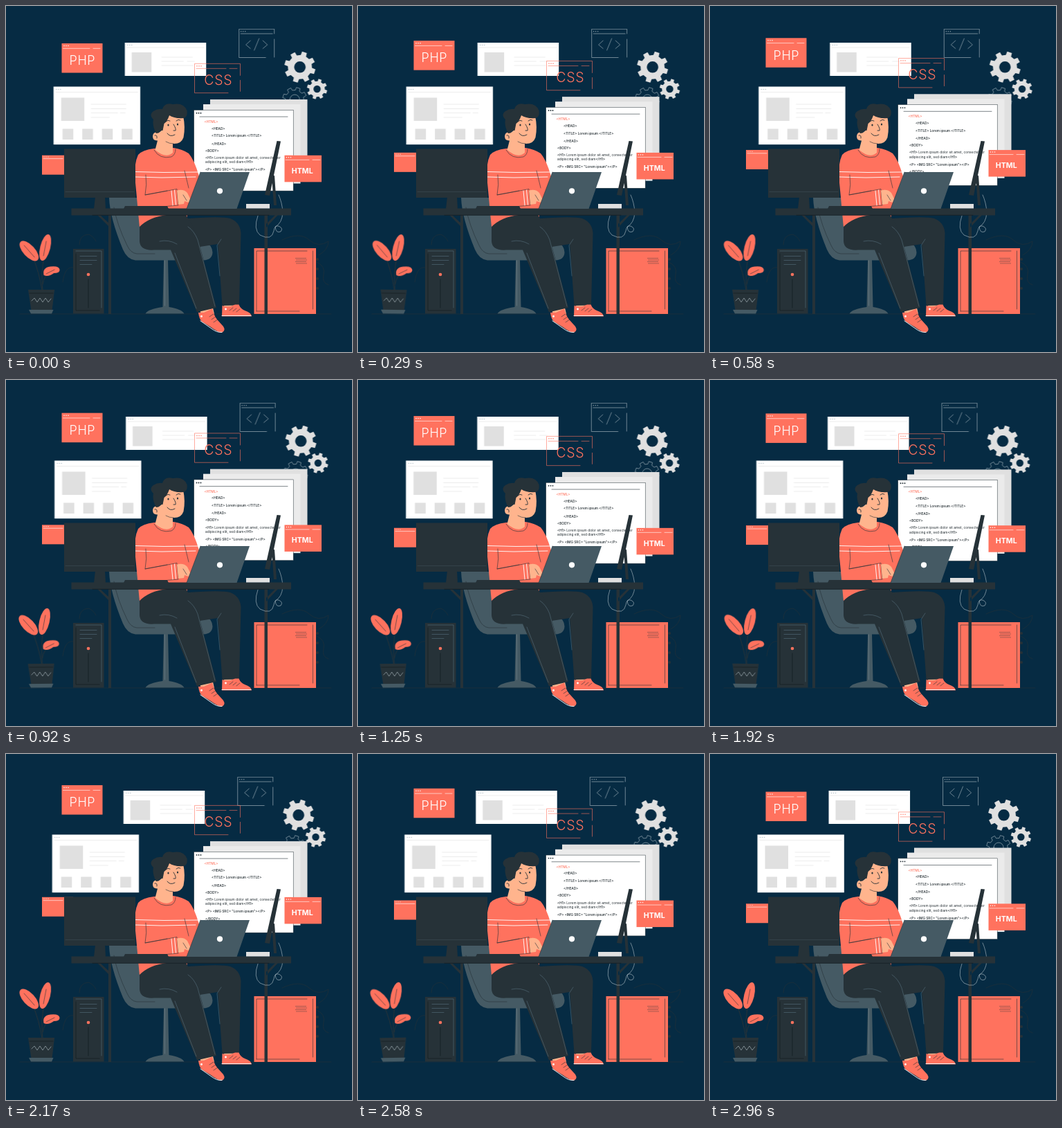
Animation, 500 px wide and 500 px high, one loop 3 s. Source, as an HTML page:

```html
<!DOCTYPE html>
<html lang="en">
<head>
<meta charset="utf-8">
<title>Programmer at work</title>
<style>
  html, body { margin: 0; width: 100%; height: 100%; overflow: hidden; background: #062b43; }
  svg { display: block; width: 100vw; height: 100vh; }
  text { font-family: Inter, "Open Sans", sans-serif; }

  .drift { animation: drift 1.5s cubic-bezier(.37, 0, .63, 1) -.8s infinite alternate; }
  .float { animation: float .75s linear -.05s infinite alternate; }
  .sway { transform-origin: 51px 445px; animation: sway .75s linear -.425s infinite alternate; }
  @keyframes drift { from { transform: translateX(-1.8px); } to { transform: translateX(1.8px); } }
  @keyframes float { from { transform: translateY(0); } to { transform: translateY(-10px); } }
  @keyframes sway { from { transform: rotate(-1deg); } to { transform: rotate(1deg); } }

  .coral { fill: #ff725e; }
  .dark { fill: #263238; }
  .slate { fill: #455a64; }
  .skin { fill: #ffb48d; }
  .white { fill: #fff; }
  .pale { fill: #e0e0e0; }
  .line { fill: none; stroke-width: .6; stroke-linecap: round; stroke-linejoin: round; }
  .ink { stroke: #263238; }
  .chalk { stroke: #fff; }
  .fog { stroke: #b8c4cc; }
  .mist { stroke: #e0e0e0; }
  .red { stroke: #ff725e; }
  .steel { stroke: #56707c; }
  .dots { fill: none; stroke-width: 1.5; stroke-linecap: round; stroke-dasharray: 0 3; }
  .code { font-size: 4.75px; font-weight: 500; fill: #1b252a; }
  .code tspan { font-weight: 400; letter-spacing: .06px; }
</style>
</head>
<body>
<svg viewBox="0 0 500 500">
  <path class="line ink" d="M20 445H470"/>
  <path class="line ink" d="M106 345Q106 331 119 330Q126 332 130 340M399 338Q425 326 438 338T466 340Q466 352 452 360M449 370Q462 376 459 388T466 403"/>
  <path class="line ink" d="M82 399Q85 375 98 378"/>

  <!-- Drifting backdrop -->
  <g class="drift">
    <rect class="white" x="171.5" y="53" width="117.5" height="48"/>
    <path class="dots fog" d="M175.5 56.5h6.2"/>
    <path class="line mist" d="M174 60H286M225 74H269M225 80H256M262 80H272M225 86H270"/>
    <rect class="pale" x="181.5" y="67" width="28.5" height="28.5"/>

    <rect class="white" x="68.5" y="116.5" width="125.3" height="83.7"/>
    <path class="dots fog" d="M72.5 120.5h6.2"/>
    <path class="line mist" d="M72 124.5H190M123 142H173M123 148.5H173M123 154.5H161M165 154.5H172M123 161H149"/>
    <rect class="pale" x="79.5" y="132.5" width="33.5" height="33.5"/>
    <path class="pale" d="M81.5 177.5h15.5v15.5h-15.5zM110 177.5h15.5v15.5h-15.5zM138.5 177.5h15.5v15.5h-15.5zM167 177.5h15.5v15.5h-15.5z"/>

    <path class="line fog" d="M375 74.5H336.500V33.300H387.500V40M387.500 48V74M339 40H385M353 50L346.500 56L353 61.500M365.500 47L358.500 64M371 50L377.500 56L371 61.500"/>
    <path class="dots fog" style="stroke-width:1.200" d="M339.500 36.700h6.200"/>

    <path id="gearBig" class="pale" fill-rule="evenodd"/>
    <path id="gearSmall" class="pale" fill-rule="evenodd"/>
    <path id="gearLine" class="line fog"/>
  </g>

  <!-- Floating windows -->
  <g class="float">
    <rect x="295" y="135.700" width="140.500" height="116" fill="#e0e0e0"/>
    <rect x="285" y="142.700" width="140.500" height="114.500" fill="#ebebeb"/>
    <rect class="white ink" x="271.700" y="151" width="143.500" height="116.800" stroke-width=".5"/>
    <path class="dots ink" style="stroke-width:1.900" d="M275.500 155.500h6.500"/>
    <path class="line ink" d="M280 160.700H407"/>
    <g class="code">
      <text x="286.500" y="169.700" class="coral">&lt;HTML&gt;</text>
      <text x="297" y="179.300">&lt;HEAD&gt;</text>
      <text x="297" y="190.100">&lt;TITLE&gt; Lorem ipsum &lt;/TITLE&gt;</text>
      <text x="297" y="201.200">&lt;/HEAD&gt;</text>
      <text x="288" y="211.200">&lt;BODY&gt;</text>
      <text x="288" y="221.600">&lt;H1&gt; <tspan>Lorem ipsum dolor sit amet, consectetuer</tspan></text>
      <text x="288" y="228"><tspan>adipiscing elit, sed diam</tspan>&lt;/H1&gt;</text>
      <text x="288" y="239">&lt;P&gt; &lt;IMG SRC= "Lorem ipsum"&gt;&lt;/P&gt;</text>
      <text x="288" y="249.300">&lt;/BODY&gt;</text>
    </g>

    <rect class="coral" x="80.500" y="54.700" width="59" height="42.500"/>
    <path class="dots chalk" d="M84 58.200h6.200"/>
    <path class="line chalk" d="M82.500 62H121M126 62H136"/>
    <text class="white" x="110.300" y="86" font-size="18" font-weight="300" letter-spacing=".5" text-anchor="middle">PHP</text>

    <path class="line red" d="M321 126.300H272.500V84H338.500V101M338.500 108V124M275 91H318M323 91H334"/>
    <path class="dots red" d="M276 87.500h6.200"/>
    <text class="coral" x="306.800" y="114.700" font-size="19.500" font-weight="300" letter-spacing=".8" text-anchor="middle">CSS</text>

    <rect class="coral" x="52" y="216.400" width="45" height="28"/>
    <path class="dots chalk" style="stroke-width:1.100" d="M55 218.700h6.200"/>
    <path class="line chalk" d="M54 221.300H82"/>

    <rect class="coral" x="402.500" y="216.500" width="53.500" height="38.500"/>
    <path class="dots chalk" d="M405.500 219.500h6.200"/>
    <path class="line chalk" d="M404 223H438M443 223H454"/>
    <text class="white" x="428.300" y="242.300" font-size="10.600" font-weight="700" text-anchor="middle">HTML</text>
  </g>

  <!-- Computer towers -->
  <rect class="coral" x="358.500" y="350" width="89.500" height="95"/>
  <path class="line ink" d="M362 441V354H435M443.500 354V438M362 441H424"/>
  <path class="dots ink" style="stroke-width:1;stroke-dasharray:0 2" d="M419 364.500H434.500M420 367H435M419 369.500H434.500M420 372H435"/>
  <path class="dots ink" style="stroke-width:4;stroke-dasharray:0 14" d="M450 366V409"/>
  <rect class="dark" x="97" y="351" width="44.500" height="93.500"/>
  <path class="line steel" d="M101 354H138V436M107 361.500H131M107 367.500H131M107 373.500H124"/>
  <path class="line" stroke="#10191e" d="M101 358V440H135M119 395V436"/>
  <circle class="coral" cx="119" cy="388" r="2.300"/>

  <!-- Chair -->
  <path class="slate" d="M149 277H197L200 340H286Q298 345 298.500 356Q298 367 285 367.500H187Q175 366 169 352Q150 306 149 277Z"/>
  <path class="line ink" d="M156 291Q160 315 175 346Q180 357 189 358H215"/>
  <path class="slate" d="M228 366H234L235.500 435Q254 438 257.500 444.500H201.500Q205 438 226.500 435Z"/>
  <path class="line" stroke="#6f838d" d="M229.500 368V433"/>

  <!-- Torso and head -->
  <path class="coral" d="M214 206Q197 208 191 215Q185 227 186.500 250L193 320H258L266 286L279 246Q272 222 264 213Q255 207 242 205Z"/>
  <path class="line chalk" style="stroke-width:.9" d="M187 239.500L228 240.500L277 240M187 247L225 248L274 247"/>
  <path class="line ink" d="M202 244Q204 258 201 273L233 267M258 238L264 263M214 208Q222 222 239 218Q245 215 245 207"/>
  <path class="line ink" d="M201 273L247 264.500L249 288L226 290"/>
  <path class="line chalk" style="stroke-width:.9" d="M239 267L241 288M243.500 266L245.500 287"/>
  <path class="skin" d="M247 266.500Q257 264 262 270L267 280L264 284L258 282L257 286L249 287Z"/>
  <path class="line ink" d="M256 273L261 281"/>
  <path class="skin" d="M227 166Q240 150 256 159Q259.500 175 256.500 190Q253 200 241 199L241 212Q231 221 215.500 208L219 194.500Q212 195 212 188Q213 181 221 183L226 179Z"/>
  <path class="dark" d="M217 184Q211 173 213 164Q206 157 213 152Q219 148 226 149Q229 139 241 142Q257 139 261.500 151Q263 160 257 162Q243 163 236 158Q233 167 228.500 170L226.500 180Q222 179 220.500 183.500Z"/>
  <path class="line ink" style="stroke-width:.9" d="M231 167Q234 164 237 166M246 166Q249 163 252 165M242 171Q246 177 245 180H242M233 184Q237 190 244 186M215 187Q219 186 218 191"/>
  <path class="line ink" d="M231 196Q236 199 242 199"/>
  <ellipse class="dark" cx="234.500" cy="172" rx="1.100" ry="1.500"/>
  <ellipse class="dark" cx="248" cy="171" rx="1.100" ry="1.500"/>

  <!-- Legs -->
  <path class="skin" d="M279 436L298 432L301 445L283 449ZM315 428H332V438H315Z"/>
  <path class="dark" d="M252 308Q310 303 324 307Q338 312 339.500 328L337 432.500L312.500 433L306 344L280 348Z"/>
  <path class="dark" d="M193 319Q207 305 232 302H260Q271 318 277 335L304 436L276 442.500L238 352.500H214Q194 354 193 340Z"/>
  <path class="line steel" d="M263 319Q272 325 277 338L302 434M244 357L275 437M247 344Q235 337 222 340M311 337L305 346L309 390"/>
  <path class="coral" d="M278 443L286 443Q293 440 298 437.500Q301 448 305 453L314 463Q318 469 312 472Q305 471 296 464L283 456Q279 452 278 443ZM312.500 433Q323 436 331 431.500H336.500Q339 438 346 440.500Q354 443 355 448.500H312Z"/>
  <path class="line chalk" style="stroke-width:.9" d="M281 455L296 465.500Q305 472.500 312 471.500M312 447.500H354"/>
  <path class="line ink" d="M294 449L300 445M297 453L303 449M300 457L306 453M323 440L328 436M328 441L333 437M333 442L338 438"/>
  <circle class="white" cx="282.500" cy="448.500" r="1.400"/>
  <circle class="white" cx="317.500" cy="438" r="1.400"/>

  <!-- Desk -->
  <path class="dark" d="M148 302H152V445H148ZM373.500 302H378V445H373.500ZM132 302H136L150 315V320ZM393 302H389L376 315V320Z"/>
  <path class="line fog" d="M364 303Q357 323 367 331Q384 340 387 325Q388 317 394 318Q401 321 397 326Q390 329 389 319Q399 314 400 298Q399 284 394 273"/>
  <rect class="dark" x="94.500" y="292.500" width="317.500" height="10"/>
  <path class="line" stroke="#10191e" d="M125 302.300H380"/>
  <rect class="dark" x="84" y="206.500" width="103" height="70.500"/>
  <path class="line" stroke="#3d4d55" d="M86 268.500H185"/>
  <path class="dark" d="M129 276H143L144 293H127ZM172 289H233L235 293H170Z"/>
  <path class="slate" d="M281 240H352L333.500 293H261Z"/>
  <path class="line ink" d="M281 240L261 293"/>
  <circle class="white" cx="309" cy="267.300" r="4.100"/>
  <rect class="pale" x="347" y="286" width="34" height="6.500"/>
  <path class="dark" d="M391.500 195L397 195.500L381 274L374 273ZM384 246L388 245L391 288H387Z"/>

  <!-- Plant -->
  <g class="sway">
    <path class="line ink" style="stroke-width:1" d="M52 411Q48 385 38 361M53 411Q50 390 55 360M53 402Q54 390 66 383"/>
    <ellipse class="coral" cx="33.200" cy="354" rx="8.500" ry="18" transform="rotate(-43 33.200 354)"/>
    <ellipse class="coral" cx="56.500" cy="349" rx="7.300" ry="19.500" transform="rotate(14 56.500 349)"/>
    <path class="coral" d="M54.500 389Q52 378 64 376.500Q77 375 77.500 381.500Q77 386 69 386Q61 392 54.500 389Z"/>
    <path class="line ink" d="M26 346L41 363M58 340L54 361M58 387L70 381"/>
    <path class="dark" d="M32 410H70L66.500 440H36.500Z"/>
    <path class="slate" d="M33 439H68.500L66 444.500H36Z"/>
    <path class="line fog" d="M37 426L41 422L45 428L49 422L53 428L57 422L61 428L65 423"/>
    <path class="line" stroke="#10191e" d="M34 415H68"/>
  </g>
</svg>
<script>
  // Ring of eight blunt teeth around a round hole
  function gear(id, cx, cy, outer, root, hole, tilt) {
    const teeth = 8, step = 2 * Math.PI / teeth;
    const at = (r, a) => (cx + r * Math.cos(a)).toFixed(2) + " " + (cy + r * Math.sin(a)).toFixed(2);
    const points = [];
    for (let i = 0; i < teeth; i++) {
      const a = tilt + i * step;
      points.push(at(root, a - step * .29), at(outer, a - step * .2), at(outer, a + step * .2), at(root, a + step * .29));
    }
    const ring = `M${cx - hole} ${cy}a${hole} ${hole} 0 1 0 ${2 * hole} 0a${hole} ${hole} 0 1 0 ${-2 * hole} 0z`;
    document.getElementById(id).setAttribute("d", "M" + points.join("L") + "z" + ring);
  }
  gear("gearBig", 424.5, 88.3, 22.7, 17.5, 8.3, .3);
  gear("gearSmall", 449.3, 120, 14.8, 11.3, 5.2, .3);
  gear("gearLine", 417, 135, 17.5, 13.5, 7, .3);
</script>
</body>
</html>
```
